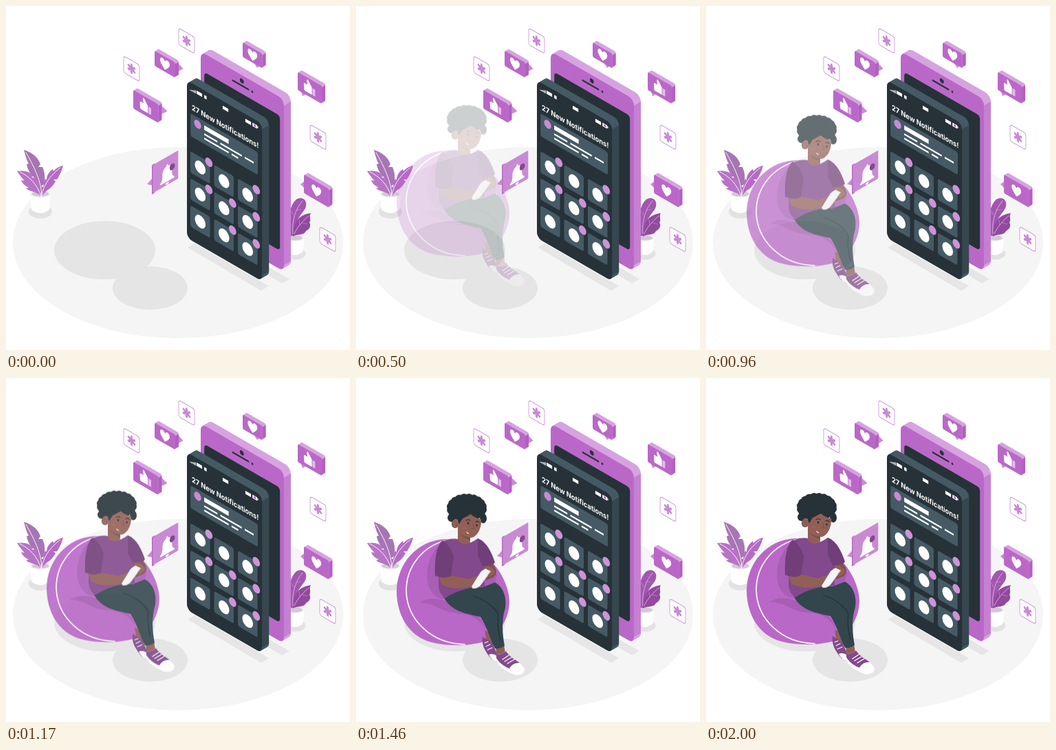
Animation, 500 px wide and 500 px high, one loop 2040 ms. Source, as an HTML page:

```html
<!DOCTYPE html>
<html lang="en">
<head>
<meta charset="utf-8">
<title>Notifications</title>
<style>
html, body { margin: 0; width: 100%; height: 100%; overflow: hidden; background: #fff; }
svg { display: block; width: 100vw; height: 100vh; }
text { font: 700 10.7px Inter, "Open Sans", sans-serif; fill: #fff; }
</style>
</head>
<body>
<svg id="stage" viewBox="0 0 500 500"></svg>
<script>
const PURPLE = '#ba68c8', LIGHT = '#d6a3e0', MID = '#c98ad4', FOLD = '#a75eb4';
const DARK = '#263238', SLATE = '#37474f', TILE = '#455a64';
const SKIN = '#915f56', SHADE = '#7d5049', SHIRT = '#82498c', SLEEVE = '#703e78';

const path = (d, fill, extra = '') => `<path d="${d}" fill="${fill}" ${extra}/>`;
const line = (d, stroke, width = 1) =>
  `<path d="${d}" fill="none" stroke="${stroke}" stroke-width="${width}" stroke-linecap="round" stroke-linejoin="round"/>`;
const oval = (x, y, rx, ry, fill) => `<ellipse cx="${x}" cy="${y}" rx="${rx}" ry="${ry}" fill="${fill}"/>`;
const rect = (x, y, w, h, r, fill, extra = '') =>
  `<rect x="${x}" y="${y}" width="${w}" height="${h}" rx="${r}" fill="${fill}" ${extra}/>`;
const at = (x, y, body) => `<g transform="translate(${x} ${y})">${body}</g>`;
const iso = (x, y, body, dir = 1) => `<g transform="matrix(.866 ${dir * .5} 0 1 ${x} ${y})">${body}</g>`;

// Rounded isometric slab with its front face at x, y.
function slab(x, y, w, h, d, r, [face, top, side], body = '') {
  let out = '';
  for (let k = d; k > 0; k -= .5) out += iso(x + k, y - k * .577, rect(0, 0, w, h, r, top));
  const rx = x + w * .866, ry = y + w * .5, rise = d * .577;
  out += path(`M${rx} ${ry + r}l${d} ${-rise}v${h - 2 * r}l${-d} ${rise}z`, side);
  return out + iso(x, y, rect(0, 0, w, h, r, face) + body);
}

const heart = path('M0 8C-4 4-8 1-8-3C-8-8-2-9 0-4C2-9 8-8 8-3C8 1 4 4 0 8z', '#fff');
const thumb = path('M-10-1Q-10-3-8-3H-3.5C-6-8-5-11-3-10.5L3.5-2.5V8H-8Q-10 8-9.5 5z', '#fff')
  + rect(4.5, -2, 4.5, 10, .6, '#e1bee7');
const star = [0, 60, 120].map(a =>
  `<path d="M0-5.6V5.6" transform="rotate(${a})" stroke="${MID}" stroke-width="3.6" stroke-linecap="round"/>`).join('');

const bubble = (x, y, w, h, icon, tail) =>
  path(tail, MID) + slab(x, y, w, h, 5, 2, [PURPLE, LIGHT, '#b35fc2'], at(w / 2, h / 2, icon));
const starCard = (x, y) =>
  iso(x, y, rect(0, 0, 26.5, 24, 3.5, '#fff', `stroke="${MID}" stroke-width=".9"`) + at(13.2, 12, star));

function floor() {
  return oval(250, 344, 240, 139, '#f5f5f5')
    + oval(143.5, 355, 73.5, 42.5, '#e5e5e5') + oval(209.5, 410, 54.5, 31.5, '#e5e5e5')
    + path('M264 351L274 345L382 407L371 414z', '#e6e6e6')
    + path('M290 338L301 332L412 397L401 403z', '#e6e6e6');
}

function pot(x, y, w, h) {
  return oval(x, y + h - 2, w + 2, w * .65, '#e2e2e2')
    + path(`M${x - w} ${y}L${x - w + 2} ${y + h - 5}Q${x} ${y + h + 5} ${x + w - 2} ${y + h - 5}L${x + w} ${y}z`, '#fff')
    + oval(x, y, w, w * .38, '#f2f2f2') + oval(x, y, w - 2.5, w * .27, '#d2c8d4');
}

function leftPlant() {
  return pot(50, 273, 15, 28)
    + path('M52 277C50 266 44 259 39 251L41 249C34 243 31 236 30 230L33 229C29 222 28 216 26 209C38 213 47 220 50 230L47 234L53 234C57 243 57 250 55 259L51 262L55 264z', '#a875b4')
    + path('M52 277C55 266 53 260 57 251L59 253C59 245 64 240 68 237L69 240C74 235 78 233 83 232C81 240 78 246 74 252L69 252L72 255C68 261 65 265 61 267C57 270 54 273 52 277z', '#b56bc5')
    + path('M51 277C45 269 36 271 29 265L33 264C27 261 24 258 22 253L27 254C22 249 19 244 16 240C27 238 35 241 40 247L37 249L43 250C49 257 50 267 51 277z', '#b774c5')
    + line('M52 277C52 255 40 232 29 213M52 275C55 257 68 243 79 235M51 277C46 259 33 247 20 241', '#fff', .9);
}

function rightPlant() {
  return pot(420, 337, 13.5, 25)
    + path('M414 334C410 315 410 292 422 281C431 276 438 282 436 291C434 301 420 305 419 334z', '#a157af')
    + path('M417 335C417 317 423 304 443 301C440 306 444 310 441 315C444 319 441 325 436 327C433 334 423 331 417 335z', '#92499f')
    + line('M417 331C415 312 421 295 431 283M419 331C424 320 432 312 440 305', '#e3c5e8', .8)
    + line('M418 304L415 298M421 297L429 296M427 319L426 311M430 315L438 317', '#c99bd2', .6);
}

function backPhone() {
  return slab(283, 66, 139.7, 250, 10, 9, [PURPLE, LIGHT, '#c680d2'],
    rect(6, 27, 127, 196, 5, DARK) + oval(69, 8.4, 3.4, 3.2, DARK)
    + line('M54 15.3H80', DARK, 2.6) + oval(86.6, 15.4, 1.6, 1.6, DARK));
}

function frontPhone() {
  const bar = (x, y, w, h) => rect(x, y, w, h, 0, '#fff');
  let ui = [0, 1, 2, 3].map(i => bar(5 + i * 2.6, 10.8 - i, 1.7, 1.2 + i)).join('')
    + bar(16, 6.8, 9.5, 4.6) + bar(29, 6.8, 4, 4.6) + bar(60, 6.8, 9.5, 4.6) + bar(98, 6.8, 9.5, 4.6)
    + bar(110, 6.4, 8, 5) + bar(118, 7.7, 1.6, 2.4) + oval(114, 8.9, 2, 1.8, PURPLE)
    + `<text x="8" y="38.8">27 New Notifications!</text>`
    + rect(6, 45, 113, 33, 3, TILE) + oval(18, 55, 6, 6, MID) + bar(29, 51, 41, 6.5)
    + bar(29, 62.5, 22, 2.4) + bar(56, 62.5, 36, 2.4) + bar(97, 62.5, 15, 2.4)
    + bar(29, 68.8, 41, 2.4) + bar(75, 68.8, 11, 2.4);
  for (let i = 0; i < 9; i++) {
    const x = 5.8 + (i % 3) * 39.8, y = 100 + Math.floor(i / 3) * 39.4;
    ui += rect(x, y, 33, 31, 3, TILE) + oval(x + 16.5, y + 15.5, 9, 9, '#fff');
    if (i !== 1 && i !== 6) ui += oval(x + 31, y + .7, 6.2, 6.2, '#ce93d8');
  }
  return slab(263, 108, 126, 229, 10, 8, [DARK, TILE, SLATE], ui);
}

function bubbles() {
  const bell = path('M-12 8C-8 6-8 2-8-3C-8-9-4-12-1.5-12.5C-1.5-15.5 1.5-15.5 1.5-12.5C5-12 8-8 8-3C8 2 8 6 12 8V10H-12z', '#fff')
    + path('M-3 11.5H3Q2.5 14.5 0 14.5T-3 11.5z', '#fff') + oval(8.5, -7, 4.4, 4.4, SHIRT);
  return starCard(251, 32) + starCard(171, 72.5) + starCard(442, 172) + starCard(456, 320.5)
    + bubble(216, 65, 34.6, 22, heart, 'M250 83L257.5 91L249 96z')
    + bubble(185, 122, 42, 27, thumb, 'M225 144L234.5 153L222 159z')
    + bubble(344, 53, 33, 21, heart, 'M360 82L365 90L370 86z')
    + bubble(424, 96, 40.5, 26, thumb, 'M428 122L431 131L438 127z')
    + bubble(433, 245, 42, 27, heart, 'M435 254L428 259L435 266z')
    + path('M214 249L205 259L214 261z', MID)
    + iso(212, 231, rect(0, 0, 5, 43, 1.5, PURPLE), -1)
    + iso(213.5, 231, rect(0, 0, 42.5, 41, 1.5, MID) + at(24, 26, bell), -1);
}

function beanBag() {
  return path('M130 233C88 235 59 269 59 310C60 350 82 378 114 384C137 389 164 388 183 383C207 374 223 350 223 323C222 298 206 272 190 259C174 240 154 232 130 233z', PURPLE)
    + path('M122 241C103 258 98 291 109 308C114 317 121 320 130 320L190 330L205 285L182 245C160 232 137 231 122 241z', FOLD)
    + path('M93 326C105 316 121 320 135 325C155 334 171 339 181 349C190 361 188 372 192 379C188 352 170 341 146 341C126 340 111 324 93 326z', FOLD)
    + line('M134 234C98 242 73 272 73 308C74 350 109 385 158 386', '#fff', 1.7);
}

function shoes() {
  return path('M187 366L197 370L202 388L191 390z', SKIN)
    + path('M184 375L198 384L205 400L205 411Q199 411 194 404C188 396 182 387 184 375z', SHIRT)
    + path('M193 401Q199 398 205 403V411Q198 411 193 401z', '#fff')
    + line('M187 384L192 382M189 389L195 386M191 394L198 391', '#fff', 1.1)
    + path('M203 388L215 386L217 399Q211 405 204 401z', SKIN)
    + path('M204 400Q211 402 218 396C224 406 238 411 244 420C247 428 239 432 230 430C219 426 206 418 204 409z', '#fff')
    + path('M204 400Q211 402 218 396C223 404 231 408 238 413Q228 412 223 421C214 418 207 411 204 406z', SHIRT)
    + line('M213 408L222 402M216 411L226 405M220 414L230 408', '#fff', 1.4);
}

function body() {
  return path('M128 318C142 307 164 302 184 303L202 296C216 304 219 320 217 333C211 351 213 372 216 388Q210 393 202 392C195 378 190 360 181 346C160 342 137 337 128 318z', '#33464e')
    + line('M171 316C187 321 201 331 207 343C204 358 208 371 210 380', DARK, 1.3)
    + path('M122 238C132 233 143 231 150 234Q158 246 177 232C188 237 193 248 197 264L187 274L187 302C167 302 145 308 130 319Q121 313 120 301z', SHIRT)
    + path('M126 235C116 244 114 266 115 286Q128 292 138 287L142 259Q138 244 126 235z', SLEEVE)
    + path('M177 232C190 237 197 252 202 267Q196 275 185 274L177 257z', SLEEVE)
    + path('M121 288Q131 291 139 286L163 291L177 286L183 293L174 301C157 306 136 306 124 299z', SKIN)
    + path('M185 274L198 269C205 276 206 283 200 288L188 293L183 282L190 278z', SHADE)
    + path('M168 302L181 281Q186 276 194 274Q198 274 196 279L181 300Q176 305 170 305z', '#f4f4f4')
    + line('M169 304Q176 306 181 300L197 279', '#d0d0d0', .9)
    + path('M185 272L195 273Q203 277 202 283L194 289L192 285L197 280L190 277z', SKIN);
}

function head() {
  const curls = Array.from({ length: 14 }, (_, i) => {
    const a = 2.65 + i * .315;
    return oval(161 + 23 * Math.cos(a), 188 + 15 * Math.sin(a), 6.2, 6.2, DARK);
  }).join('');
  return path('M148 216L166 225V237Q157 245 148 236z', SKIN) + path('M150 223Q157 231 166 230V234Q155 232 150 223z', SHADE)
    + curls + oval(161, 189, 26, 19, DARK) + oval(139, 202, 6, 6, DARK) + oval(144, 211, 5, 6, DARK) + oval(185, 203, 5, 7, DARK)
    + path('M151 204C158 203 163 198 167 197Q174 203 182 204C183 214 178 229 168 231C157 230 149 225 148 215z', SKIN)
    + oval(144.5, 210.5, 5, 6.5, SKIN) + line('M142 208Q147 208 146 214', SHADE, .9)
    + path('M148 200Q154 198 155 203L150 211Q147 207 148 200z', DARK)
    + oval(156.5, 217, 3, 2.3, '#9d6159')
    + oval(163, 210, 1.4, 1.7, DARK) + oval(175.5, 213, 1.3, 1.6, DARK)
    + line('M160 206Q163 203.5 166 206M174 208Q177 206 179 209', DARK, 1.1)
    + line('M170 211L171.5 218L168 217.5', SHADE, .9)
    + path('M160 221.5Q162 224 165 225Q161.5 226.5 160 221.5z', '#fff');
}

const figure = beanBag() + shoes() + body() + head();
document.getElementById('stage').innerHTML = floor() + leftPlant() + rightPlant()
  + `<g id="gate"><g id="figure">${figure}</g></g>` + backPhone() + frontPhone() + bubbles();

const timing = { duration: 2040, iterations: Infinity };
const landed = { opacity: 1, transform: 'translateY(0px)' };
document.getElementById('figure').animate([
  { opacity: 0, transform: 'translateY(-30px)', easing: 'cubic-bezier(.36, -.01, .5, 1.38)' },
  { ...landed, offset: 2000 / 2040 },
  landed
], timing);
// The faintest part of the fade stays hidden.
document.getElementById('gate').animate([
  { opacity: 0, offset: 0 }, { opacity: 0, offset: 245 / 2040 },
  { opacity: 1, offset: 245 / 2040 }, { opacity: 1, offset: 1 }
], timing);
</script>
</body>
</html>
```
